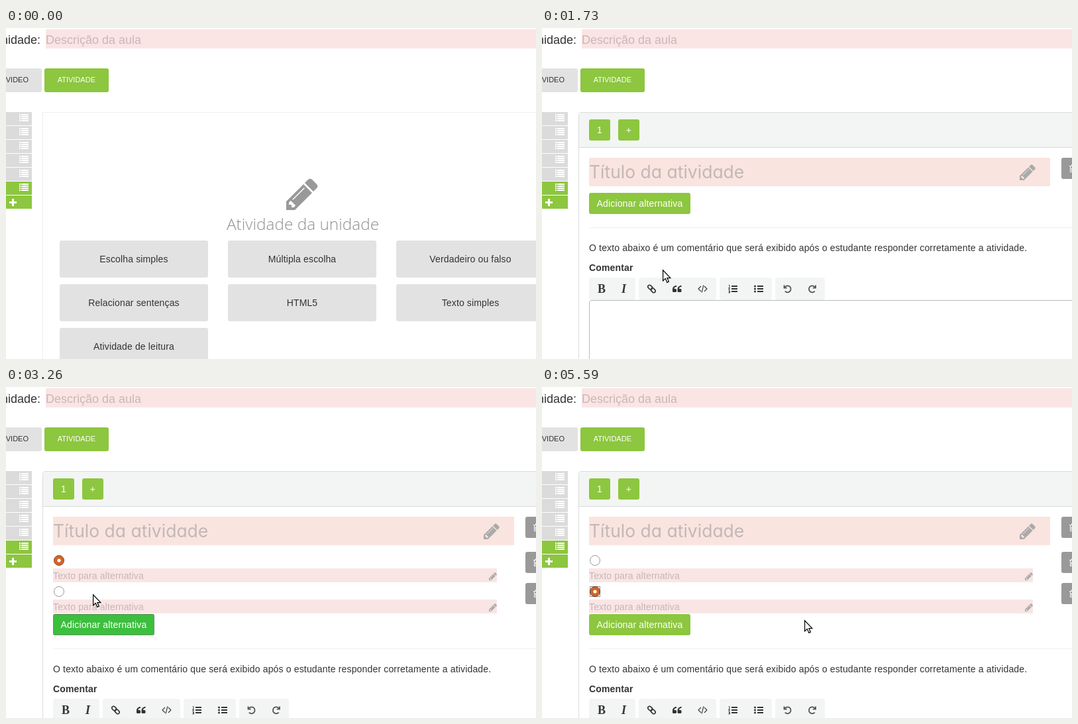
An HTML page that plays this animation: 800x500 px, repeating every 5690 ms.

```html
<!DOCTYPE html>
<html lang="pt-BR">
<head>
<meta charset="utf-8">
<title>Atividade da unidade</title>
<style>
  :root { --green: #8dc63f; --focus: #3bbf3d; --pink: #fae5e5; --peach: #fae4df; --hover: #f4dbd1; --gray: #e2e2e2; --pale: #f3f5f4; }
  html, body { margin: 0; width: 100%; height: 100%; overflow: hidden; background: #fff; }
  body { position: relative; font: 14px "Liberation Sans", Arial, sans-serif; letter-spacing: .01em; color: #333; white-space: nowrap; }
  div, svg { position: absolute; box-sizing: border-box; }
  svg { overflow: visible; }
  .layer { left: 0; top: 0; width: 800px; height: 500px; }
  .stage { overflow: hidden; }

  .label, .desc, .tab, .head, .title { letter-spacing: 0; }
  .label { right: 748px; top: 2px; font-size: 18px; line-height: 32px; }
  .desc { left: 60px; top: 2px; width: 740px; height: 29px; background: #fbe5e4; color: #c8b8b8; font-size: 18px; line-height: 32px; }
  .tab { top: 61px; height: 36px; line-height: 35px; font-size: 11px; border-radius: 3px; background: var(--gray); text-align: right; padding-right: 20px; }
  .on { background: var(--green); color: #fff; }
  .side { left: 0; top: 127px; }
  .side rect { fill: #dbdbdb; }
  .side .add, .side .cur { fill: var(--green); }

  .card { width: 224px; height: 56px; line-height: 56px; border-radius: 3px; background: var(--gray); text-align: center; }
  .a { left: 81px; } .b { left: 335px; } .c { left: 589px; }
  .r1 { top: 321px; } .r2 { top: 387px; } .r3 { top: 453px; }
  .head { left: 248px; width: 400px; top: 281px; text-align: center; color: #909090; font: 300 24.4px/30px "Open Sans", sans-serif; }
  .frame { left: 55px; top: 127px; width: 760px; height: 400px; border: 1px solid #eee; }
  .edit .frame { border-color: #d9dcdb; border-radius: 4px; }
  .bar { left: 56px; top: 128px; width: 744px; height: 53px; background: var(--pale); border-bottom: 1px solid #d9dcdb; border-radius: 3px 0 0 0; }
  .page { top: 138px; width: 32px; height: 32px; line-height: 32px; border-radius: 3px; text-align: center; }
  .title { left: 71px; top: 196px; width: 696px; height: 43px; background: var(--peach); color: #c2b8b6; font: 26.5px/43px Inter, sans-serif; font-feature-settings: "cv11"; }
  .trash { left: 784px; width: 34px; height: 32px; border-radius: 3px; background: #999; }
  .trash svg { left: 12px; top: 10px; }

  .alt { left: 71px; width: 729px; height: 47px; }
  .alt svg.radio { left: 0; top: 0; }
  .row { left: 0; top: 21px; width: 670px; height: 21px; line-height: 23px; background: var(--pink); color: #c6b6b6; }
  .row svg { left: 657px; top: 5px; }
  .alt .trash { left: 713px; top: -4px; }

  .btn { left: 71px; top: 249px; width: 153px; height: 32px; line-height: 32px; border-radius: 3px; background: var(--green); color: #fff; text-align: center; }
  .ring { inset: 0; border: 1px dotted #d8f0d0; outline: 1px dotted #555; outline-offset: -1px; border-radius: 3px; }
  .hr { left: 71px; top: 301px; width: 729px; height: 1px; background: #eee; }
  .note { left: 71px; top: 322px; line-height: 20px; letter-spacing: .0115em; }
  .group { top: 377px; height: 34px; border-radius: 4px; background: var(--pale); }
  .glyph { top: 384px; font: bold 18px/20px "Liberation Serif", "Times New Roman", serif; }
  .area { left: 71px; top: 411px; width: 760px; height: 200px; border: 1px solid #bbb; border-radius: 4px; background: #fff; }
  .line { fill: none; stroke: currentColor; }

  /* One loop is 5690 ms: 1% = 56.9 ms */
  .cut, .fade, .cursor { animation: 5690ms infinite step-end; }
  .fade { animation-timing-function: linear; }
  .start { animation-name: start; }
  .edit { animation-name: edit; }
  .html { animation-name: html; }
  .rel { animation-name: rel; }
  .esc { animation-name: esc; }
  .title { animation-name: title; }
  .push { animation-name: push; }
  .alt1 { top: 253px; animation-name: alt1; }
  .alt2 { top: 300px; animation-name: alt2; }
  .row2 { animation-name: row2; }
  .btn { animation-name: btn; }
  .ring { animation-name: ring; }
  .before { animation-name: before; }
  .after { animation-name: after; }
  .glow { animation-name: glow; }
  .cursor { left: 0; top: 0; animation-name: path; }
  .arrow { animation-name: arrow; }
  .hand { animation-name: hand; }
  .beam { animation-name: beam; }

  @keyframes start { 0% { opacity: 1 } 30.4%, 100% { opacity: 0 } }
  @keyframes edit { 0% { opacity: 0 } 30.4%, 100% { opacity: 1 } }
  @keyframes html { 0%, 17.9% { background: var(--gray) } 20.2% { background: #d2ced2 } 23.5%, 100% { background: var(--gray) } }
  @keyframes rel { 0%, 20.7% { background: var(--gray) } 23.5% { background: #d2ced2 } 27%, 100% { background: var(--gray) } }
  @keyframes esc { 0%, 23.5% { background: var(--gray) } 27.9%, 100% { background: #c9c4c8 } }
  @keyframes title { 0%, 39.5% { background: var(--peach) } 43%, 45% { background: var(--hover) } 47.9%, 100% { background: var(--peach) } }
  @keyframes push { 0% { transform: none } 49.56% { transform: translateY(47px) } 56.59%, 100% { transform: translateY(94px) } }
  @keyframes alt1 { 0% { opacity: 0 } 49.56%, 100% { opacity: 1 } }
  @keyframes alt2 { 0% { opacity: 0 } 56.59%, 100% { opacity: 1 } }
  @keyframes row2 { 0%, 62.2% { background: var(--pink) } 65.5%, 67.8% { background: var(--hover) } 71.3%, 100% { background: var(--pink) } }
  @keyframes btn { 0%, 45.8% { background: var(--green) } 47.9%, 74.69% { background: var(--focus) } 75.57%, 100% { background: var(--green) } }
  @keyframes ring { 0% { opacity: 0 } 49.56% { opacity: 1 } 74.69%, 100% { opacity: 0 } }
  @keyframes before { 0% { opacity: 1 } 74.69%, 100% { opacity: 0 } }
  @keyframes after { 0% { opacity: 0 } 74.69%, 100% { opacity: 1 } }
  @keyframes glow { 0% { fill: #e07c3c } 84.88%, 100% { fill: #d0652c } }

  @keyframes path {
    0%, 15.81% { transform: translate(440px, 476px); animation-timing-function: steps(5) }
    19.33% { transform: translate(365px, 425px); animation-timing-function: steps(5) }
    22.84% { transform: translate(225px, 385px); animation-timing-function: steps(4) }
    25.65%, 34.62% { transform: translate(182px, 365px); animation-timing-function: steps(7) }
    39.54% { transform: translate(130px, 228px); animation-timing-function: steps(3) }
    41.65% { transform: translate(124px, 184px); animation-timing-function: steps(4) }
    44.46% { transform: translate(131px, 217px); animation-timing-function: steps(4) }
    47.27%, 51.14% { transform: translate(133px, 267px); animation-timing-function: steps(4) }
    53.95%, 58.69% { transform: translate(131px, 313px); animation-timing-function: steps(10) }
    65.72% { transform: translate(123px, 327px); animation-timing-function: steps(9) }
    72.05% { transform: translate(80px, 308px); animation-timing-function: step-end }
    81.01%, 84.18% { transform: translate(81px, 307px); animation-timing-function: steps(7) }
    89.1%, 92.61% { transform: translate(317px, 373px); animation-timing-function: steps(8) }
    98.24%, 100% { transform: translate(396px, 352px) }
  }
  @keyframes arrow {
    0% { opacity: 0 } 15.81% { opacity: 1 } 17.92% { opacity: 0 } 30.4% { opacity: 1 } 39.54% { opacity: 0 }
    40.94% { opacity: 1 } 42.35% { opacity: 0 } 49.56% { opacity: 1 } 51.84% { opacity: 0 }
    56.59% { opacity: 1 } 62.21% { opacity: 0 } 67.83%, 100% { opacity: 1 }
  }
  @keyframes hand {
    0% { opacity: 0 } 17.92% { opacity: 1 } 30.4% { opacity: 0 } 45.86% { opacity: 1 }
    49.56% { opacity: 0 } 53.25% { opacity: 1 } 56.59%, 100% { opacity: 0 }
  }
  @keyframes beam {
    0% { opacity: 0 } 39.54% { opacity: 1 } 40.94% { opacity: 0 } 42.35% { opacity: 1 } 45.86% { opacity: 0 }
    51.84% { opacity: 1 } 53.25% { opacity: 0 } 62.21% { opacity: 1 } 67.83%, 100% { opacity: 0 }
  }
</style>
</head>
<body>
<svg width="0" height="0">
  <symbol id="pencil" viewBox="0 0 1792 1792"><path d="M491 1536l91-91-235-235-91 91v107h128v128h107zM1014 608q0-22-22-22-10 0-17 7l-542 542q-7 7-7 17 0 22 22 22 10 0 17-7l542-542q7-7 7-17zM960 416l416 416-832 832h-416v-416zM1643 512q0 53-37 90l-166 166-416-416 166-165q36-38 90-38 53 0 91 38l235 234q37 39 37 91z"/></symbol>
  <g id="list" fill="#fff"><path d="M20 3h2v2h-2zm3 0h11v2H23zM20 6h2v2h-2zm3 0h11v2H23zM20 9h2v2h-2zm3 0h11v2H23zM20 12h2v2h-2zm3 0h11v2H23z"/></g>
  <g id="bin" fill="none" stroke="#fff"><path d="M0 2.5h11M3.5 2V.5h4V2M1.5 3v8.5h8V3M3.5 5v5M5.5 5v5M7.5 5v5"/></g>
  <g id="off"><circle cx="9" cy="9" r="7.5" fill="#fff" stroke="#999"/></g>
  <path id="quote" d="M6 0C2.500 0 0 2.500 0 6v2.500Q0 10 1.500 10H4.500Q6 10 6 8.500V6.500Q6 5 4.500 5H2.500Q2.500 2.200 6 2z"/>
  <path id="turn" d="M1 .5v4.200h4.200M1.500 4.300A5 5 0 1 1 2.300 9.600"/>
</svg>

<div class="layer stage">
  <div class="label">Unidade:</div>
  <div class="desc">Descrição da aula</div>
  <div class="tab" style="left:-20px;width:74px">VIDEO</div>
  <div class="tab on" style="left:58px;width:97px">ATIVIDADE</div>
  <svg class="side" width="39" height="147">
    <rect width="39" height="20"/><rect y="21" width="39" height="20"/><rect y="42" width="39" height="20"/>
    <rect y="63" width="39" height="20"/><rect y="84" width="39" height="20"/>
    <rect class="cur" y="105" width="39" height="20"/><rect class="add" y="126" width="39" height="20"/>
    <use href="#list"/><use href="#list" y="21"/><use href="#list" y="42"/>
    <use href="#list" y="63"/><use href="#list" y="84"/><use href="#list" y="105"/>
    <path d="M10.500 131v11M5 136.500h11" stroke="#fff" stroke-width="3"/>
  </svg>

  <div class="layer cut start">
    <div class="frame"></div>
    <svg style="left:419px;top:223px" width="56" height="56" fill="#999"><use href="#pencil"/></svg>
    <div class="head">Atividade da unidade</div>
    <div class="card a r1 fade esc">Escolha simples</div>
    <div class="card b r1">Múltipla escolha</div>
    <div class="card c r1">Verdadeiro ou falso</div>
    <div class="card a r2 fade rel">Relacionar sentenças</div>
    <div class="card b r2 fade html">HTML5</div>
    <div class="card c r2">Texto simples</div>
    <div class="card a r3">Atividade de leitura</div>
  </div>

  <div class="layer cut edit">
    <div class="frame"></div>
    <div class="bar"></div>
    <div class="page on" style="left:71px">1</div>
    <div class="page on" style="left:115px">+</div>
    <div class="title fade">Título da atividade
      <svg style="left:648px;top:8px" width="28" height="28" fill="#aaa"><use href="#pencil"/></svg>
    </div>
    <div class="trash" style="top:196px"><svg width="12" height="12"><use href="#bin"/></svg></div>

    <div class="layer cut push">
      <div class="btn fade">Adicionar alternativa<div class="ring cut"></div></div>
      <div class="hr"></div>
      <div class="note">O texto abaixo é um comentário que será exibido após o estudante responder corretamente a atividade.</div>
      <div class="note" style="top:352px"><b>Comentar</b></div>
      <div class="group" style="left:71px;width:70px"></div>
      <div class="group" style="left:146px;width:117px"></div>
      <div class="group" style="left:268px;width:79px"></div>
      <div class="group" style="left:352px;width:75px"></div>
      <div class="glyph" style="left:84px">B</div>
      <div class="glyph" style="left:120px;font-style:italic">I</div>
      <svg class="layer" width="800" height="500" fill="#333">
        <g class="line" stroke-width="1.700" transform="translate(165.500 394) rotate(45)">
          <rect x="-7" y="-2.500" width="7.500" height="5" rx="2.300"/><rect x="-.5" y="-2.500" width="7.500" height="5" rx="2.300"/>
        </g>
        <use href="#quote" x="197" y="389"/><use href="#quote" x="204.500" y="389"/>
        <path class="line" stroke-width="1.100" d="M240 390l-4 4 4 4M245 390l4 4-4 4M243.800 388.500l-2.600 11"/>
        <path d="M286 389h9v2h-9zm0 4h9v2h-9zm0 4h9v2h-9zM325 389h9v2h-9zm0 4h9v2h-9zm0 4h9v2h-9z"/>
        <path class="line" d="M282 388.500h1v3M281.500 392.500h2l-2 2.500h2.500M281.500 397h2v3h-2M282 398.500h2"/>
        <circle cx="321.500" cy="390" r="1.500"/><circle cx="321.500" cy="394" r="1.500"/><circle cx="321.500" cy="398" r="1.500"/>
        <g class="line" stroke-width="1.800" style="color:#555">
          <use href="#turn" x="364.500" y="388"/><use href="#turn" transform="translate(414 388) scale(-1 1)"/>
        </g>
      </svg>
      <div class="area"></div>
    </div>

    <div class="alt cut alt1">
      <svg class="radio" width="18" height="18">
        <use href="#off"/>
        <g class="cut before"><circle cx="9" cy="9" r="7.500" fill="#d0652c" stroke="#a9511f"/><circle cx="9" cy="9" r="2.600" fill="#fff"/></g>
      </svg>
      <div class="row">Texto para alternativa<svg width="14" height="14" fill="#aaa"><use href="#pencil"/></svg></div>
      <div class="trash"><svg width="12" height="12"><use href="#bin"/></svg></div>
    </div>
    <div class="alt cut alt2">
      <svg class="radio" width="18" height="18">
        <use href="#off"/>
        <g class="cut after">
          <circle class="cut glow" cx="9" cy="9" r="7.500" stroke="#a9511f"/><circle cx="9" cy="9" r="2.600" fill="#fff"/>
          <rect x="1.500" y="1.500" width="15" height="15" fill="none" stroke="#222" stroke-dasharray="1"/>
        </g>
      </svg>
      <div class="row fade row2">Texto para alternativa<svg width="14" height="14" fill="#aaa"><use href="#pencil"/></svg></div>
      <div class="trash"><svg width="12" height="12"><use href="#bin"/></svg></div>
    </div>
  </div>

  <svg class="cursor" width="1" height="1" fill="#fff" stroke="#000" stroke-width="1.200">
    <path class="cut arrow" d="M.6.8v16l3.700-3.400 2.600 6 2.500-1.100-2.500-5.700h4.900z"/>
    <g class="cut hand">
      <path d="M-.5 9V2a1.300 1.300 0 0 1 2.700 0v4.500l6.500.9q2.800.5 2.800 2.600v2.200q0 1.300-1 2.800v1.700H2v-1.200L-3.100 10.200q-.9-1.200.2-1.800 1-.5 2.400.9z"/>
      <path d="M3 9.500v.8M5.500 9.500v.8M8 9.500v.8" stroke-width="1"/>
    </g>
    <g class="cut beam" fill="none">
      <path d="M-4-7.500h3l1 1 1-1h3M0-7V8M-4 8.500h3l1-1 1 1h3" stroke="#fff" stroke-width="3.500"/>
      <path d="M-3.500-7.500h2.500l1 1 1-1h2.500M0-7V8M-3.500 8.500h2.500l1-1 1 1h2.500" stroke-width="1.800"/>
    </g>
  </svg>
</div>
</body>
</html>
```
